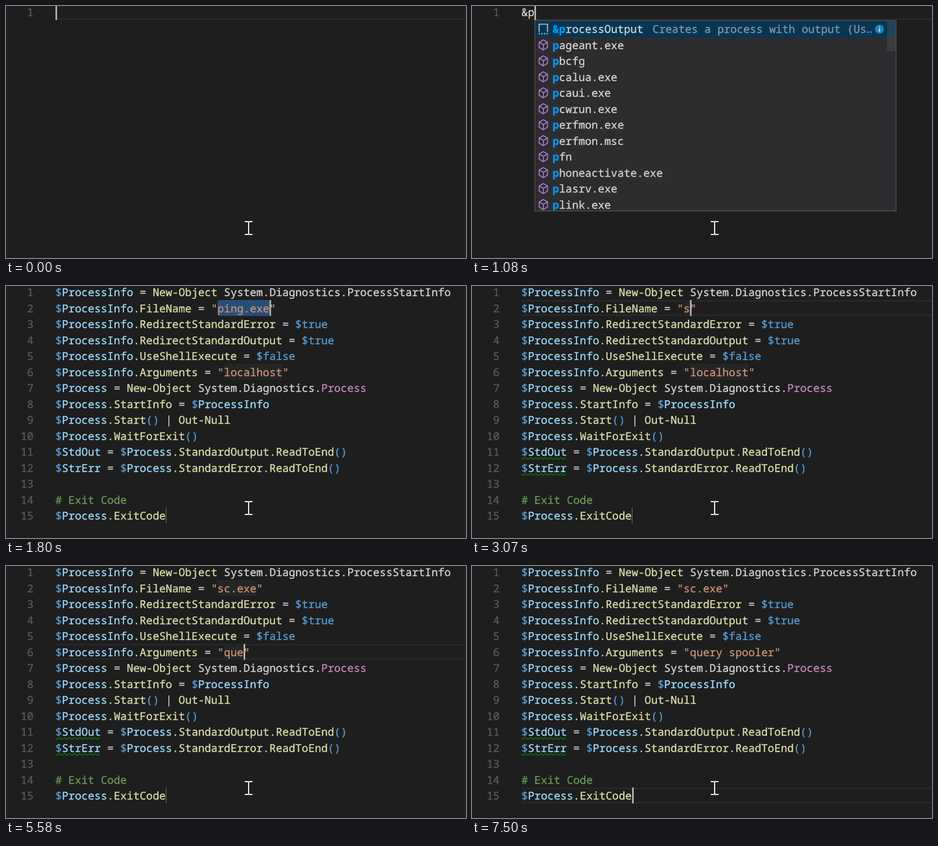
An HTML page that plays this animation: 819x450 px, repeating every 8000 ms.

```html
<!DOCTYPE html>
<html lang="en">
<head>
<meta charset="utf-8">
<title>Snippet in an editor</title>
<style>
  html, body { margin: 0; width: 100%; height: 100%; overflow: hidden; background: #1e1e1e; }
  svg { display: block; width: 819px; height: 450px; }
  text {
    font: 19.243px "Noto Sans Mono", "DejaVu Sans Mono", monospace;
    white-space: pre;
    text-rendering: geometricPrecision;
  }
  /* A hairline stroke gives the glyphs their slightly heavier weight. */
  text, tspan { fill: currentColor; stroke: currentColor; stroke-width: .35px; }
</style>
</head>
<body>
<svg id="stage" viewBox="0 0 819 450"></svg>
<script>
const LOOP = 8000;
const LEFT = 88, CHAR = 11.546, LINE = 28.5, TOP = -3.5;
const C = {
  text: '#d4d4d4', variable: '#9cdcfe', member: '#dcdcaa', string: '#ce9178',
  constant: '#569cd6', control: '#c586c0', comment: '#6a9955'
};

// First matching rule wins at each position of a line.
const RULES = [
  [/^#.*/, C.comment],
  [/^".*"/, C.string],
  [/^\$(true|false)/, C.constant],
  [/^\$/, C.constant],
  [/^Process(Info)?(?=[. ]|$)(?!$)/, C.variable],
  [/^(StdOut|StrErr)/, C.variable],
  [/^System\.Diagnostics\.(ProcessStartInfo)?/, C.text],
  [/^ProcessInfo$/, C.variable],
  [/^Process$/, C.control],
  [/^[()]+/, C.constant],
  [/^[A-Z][\w-]*/, C.member],
  [/^./, C.text]
];

const FILE_AT = [3070, 3280, 3620, 3770, 4020, 4250];
const ARGS_AT = [5330, 5410, 5580, 5680, 5790, 6020, 6130, 6250, 6480, 6560, 6810, 6940, 7100];
const ARGS_FOCUS = 4480, DONE = 7500;

// Icon kind (s = snippet, m = method, g = generic), then the label.
const P_LIST = ['s&processOutput', 'mpageant.exe', 'mpbcfg', 'mpcalua.exe', 'mpcaui.exe',
  'mpcwrun.exe', 'mperfmon.exe', 'mperfmon.msc', 'mpfn', 'mphoneactivate.exe',
  'mplasrv.exe', 'mplink.exe'];
const PRO_LIST = ['s&processOutput', 'mprompt', 'mproquota.exe', 'mprovlaunch.exe',
  'mprovtool.exe', 'sprop', 'sproph', 'mProtect-CmsMessage', 'mProximityUxHost.exe',
  'mprproc.exe', 'mprevhost.exe', 'gpowercfg.cpl'];

const col = n => LEFT + n * CHAR;
const lineTop = n => TOP + (n - 1) * LINE;
const esc = s => s.replace(/&/g, '&amp;').replace(/</g, '&lt;');
const rect = (x, y, w, h, fill, more = '') =>
  `<rect x="${x}" y="${y}" width="${w}" height="${h}" fill="${fill}" ${more}/>`;
const text = (x, y, body, color, more = '') =>
  `<text x="${x}" y="${y}" color="${color}" ${more}>${body}</text>`;
const path = (d, stroke, width, more = '') =>
  `<path d="${d}" fill="none" stroke="${stroke}" stroke-width="${width}" ${more}/>`;
const typed = (word, times, t) => word.slice(0, times.filter(at => at <= t).length);

function codeLine(n, code) {
  let out = '', rest = code;
  while (rest) {
    const [rule, color] = RULES.find(([r]) => r.test(rest));
    const part = rest.match(rule)[0];
    out += `<tspan color="${color}">${esc(part)}</tspan>`;
    rest = rest.slice(part.length);
  }
  const y = lineTop(n) + 21.5;
  return text(49, y, n, '#5a5a5a', 'text-anchor="end"') + text(LEFT, y, out, C.text);
}

const caret = (n, c) => rect(Math.round(col(c) + .25), lineTop(n), 3, LINE, '#aeafad');

const activeLine = n =>
  rect(LEFT, lineTop(n), 731, 3, '#282828') + rect(LEFT, lineTop(n) + LINE - 3, 731, 3, '#282828');

const field = (n, c, length, selected) => rect(col(c), lineTop(n), length * CHAR, LINE,
  selected ? '#264f78' : '#262626', selected ? 'rx="4"' : '');

function squiggle(n) {
  const y = lineTop(n) + LINE - 4;
  let d = `M${LEFT} ${y + 1.6}`;
  for (let x = LEFT; x < 165; x += 9) d += `L${x + 2.6} ${y + 3.6}L${x + 7.2} ${y + .4}`;
  return path(d, '#008000', 1.5);
}

function icon(kind, x, y) {
  const at = `transform="translate(${x} ${y})"`;
  if (kind === 's') {
    return path('M-7.5 5.5V-8.5H7.5V5.5', C.text, 1.6, at) +
      path('M-8.3 8.5H8.3', C.text, 1.8, at + ' stroke-dasharray="2.2 2.5"');
  }
  return path('M-7.5-4.5L0-9L7.5-4.5V4.5L0 9L-7.5 4.5ZL-7.5-4.5L0-.5L7.5-4.5M0-.5V9',
    kind === 'm' ? '#b180d7' : '#a8a8a8', 1.5, at + ' stroke-linejoin="round"');
}

// Bold the letters that match what has been typed, allowing swapped letters.
function label(word, query) {
  const low = word.toLowerCase(), hits = new Set();
  let last = -1;
  for (const ch of query) {
    let i = low.indexOf(ch, last + 1);
    if (i < 0) i = low.indexOf(ch);
    if (i >= 0) { hits.add(i); last = i; }
  }
  return [...word].map((ch, i) => hits.has(i)
    ? `<tspan color="#0097fb" font-weight="700">${esc(ch)}</tspan>` : esc(ch)).join('');
}

function popup(query, anchor, detail) {
  const x = Math.round(col(anchor) + .3), few = query.length > 2;
  let out = rect(x, 25, 645, 342, '#2d2d30') + rect(x + 2, 27, 641, LINE, '#073655');
  (few ? PRO_LIST : P_LIST).forEach((item, i) => {
    const y = 41.5 + i * LINE;
    out += icon(item[0], x + 16, y - .5) + text(x + 32.5, y + 6.5, label(item.slice(1), query), C.text);
  });
  if (detail) {
    const grey = '#8798a4';
    out += text(x + 210.5, 48, 'Creates a process with output (Us', grey) +
      `<circle cx="${x + 594}" cy="46.7" r="1.4" fill="${grey}"/>` +
      `<circle cx="${x + 599}" cy="46.7" r="1.4" fill="${grey}"/>` +
      `<circle cx="${x + 614.5}" cy="41.5" r="8" fill="#1b81bd"/>` +
      rect(x + 613.5, 40, 2, 6, '#d5e4ee') + rect(x + 613.5, 36.5, 2, 2, '#d5e4ee');
  }
  out += rect(x + 628, 27, 15, few ? 151 : 54, '#797979', `opacity="${few ? .4 : .22}"`);
  return out + rect(x + 1, 26, 643, 340, 'none', 'stroke="#454545" stroke-width="2"');
}

function typingScene(t) {
  const query = typed('&pro', [470, 930, 1160, 1320], t);
  const anchor = [1000, 1240, 1400].filter(at => at <= t).length + 1;
  return activeLine(1) + codeLine(1, query) + caret(1, query.length) +
    (anchor > 1 ? popup(query, anchor, t >= 1080) : '');
}

function snippetScene(t) {
  const fileSelected = t < FILE_AT[0];
  const argsSelected = t >= ARGS_FOCUS && t < ARGS_AT[0];
  const file = typed('sc.exe', FILE_AT, t) || 'ping.exe';
  const args = typed('query spooler', ARGS_AT, t) || 'localhost';
  const done = t >= DONE;
  const hidden = (t >= 2280 && t < 2740) || (t >= 5030 && t < 5330);
  const [row, column] = done ? [15, 17] : t < ARGS_FOCUS ? [2, 25 + file.length] : [6, 26 + args.length];
  const lines = [
    '$ProcessInfo = New-Object System.Diagnostics.ProcessStartInfo',
    `$ProcessInfo.FileName = "${file}"`,
    '$ProcessInfo.RedirectStandardError = $true',
    '$ProcessInfo.RedirectStandardOutput = $true',
    '$ProcessInfo.UseShellExecute = $false',
    `$ProcessInfo.Arguments = "${args}"`,
    '$Process = New-Object System.Diagnostics.Process',
    '$Process.StartInfo = $ProcessInfo',
    '$Process.Start() | Out-Null',
    '$Process.WaitForExit()',
    '$StdOut = $Process.StandardOutput.ReadToEnd()',
    '$StrErr = $Process.StandardError.ReadToEnd()',
    '',
    '# Exit Code',
    '$Process.ExitCode'
  ];
  let out = fileSelected || argsSelected ? '' : activeLine(row);
  if (!done) {
    out += field(2, 25, file.length, fileSelected) + field(6, 26, args.length, argsSelected) +
      rect(284.5, lineTop(15), 1.5, LINE, '#5c5c5c');
  }
  out += lines.map((code, i) => codeLine(i + 1, code)).join('');
  if (t >= 2590) out += squiggle(11) + squiggle(12);
  return hidden ? out : out + caret(row, column);
}

const pointer = path('M425 385H430Q432 385 432 387Q432 385 434 385H439' +
  'M432 386V407M425 408H430Q432 408 432 406Q432 408 434 408H439', '#f4f4f4', 2);

const stage = document.getElementById('stage');
let shown = '';

function draw(t) {
  const next = rect(0, 0, 819, 450, '#1e1e1e') +
    (t < 1800 ? typingScene(t) : snippetScene(t)) + pointer;
  if (next !== shown) stage.innerHTML = shown = next;
}

const start = performance.now();
function tick() {
  draw((performance.now() - start) % LOOP);
  requestAnimationFrame(tick);
}
tick();
</script>
</body>
</html>
```
